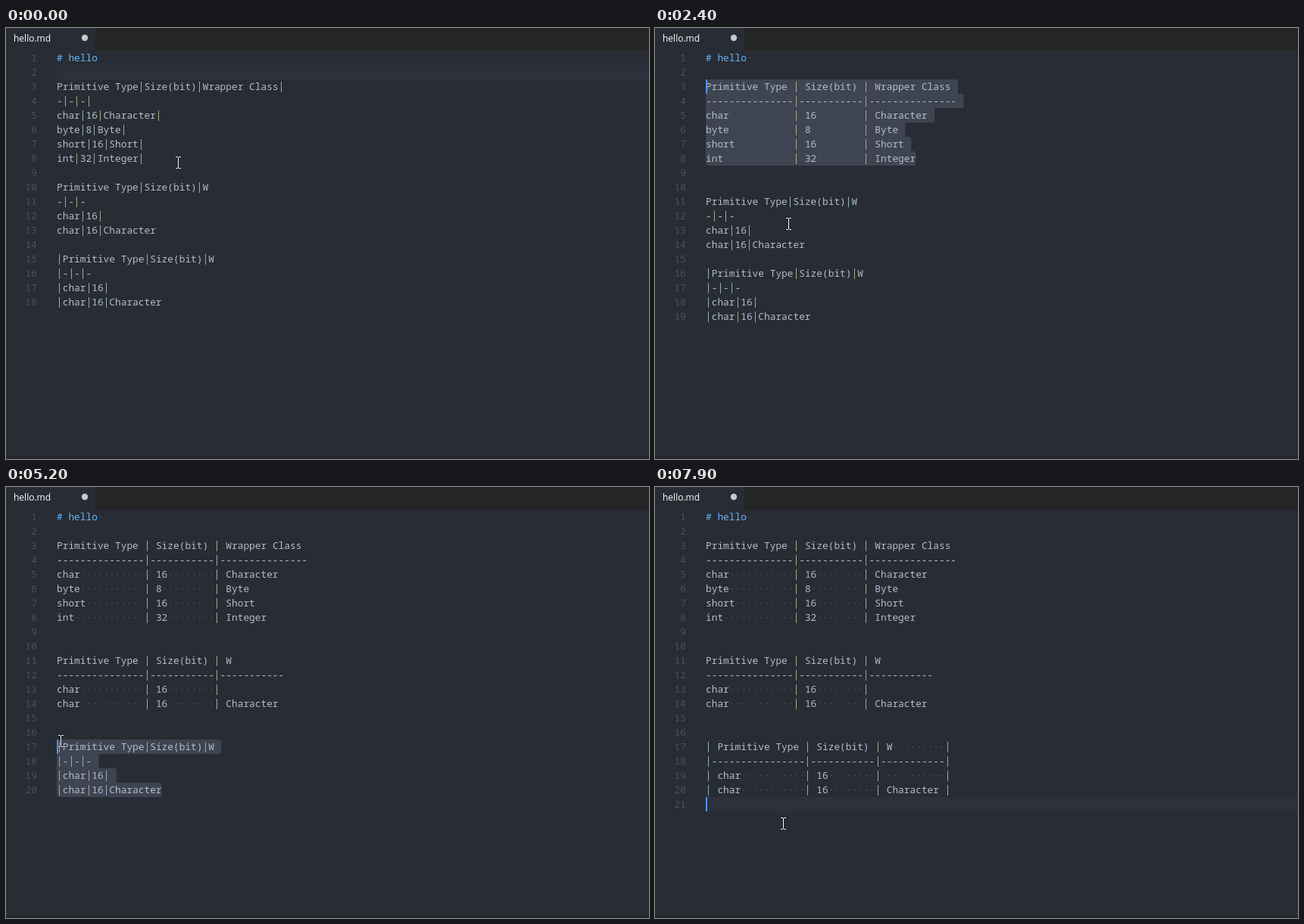
Recreate the animation shown at these times as an HTML page with a canvas. Size 849x570 px, loop 8300 ms.

```html
<!DOCTYPE html>
<html lang="en">
<head>
<meta charset="utf-8">
<title>Table formatting</title>
<style>
html, body { margin: 0; width: 100%; height: 100%; overflow: hidden; background: #282c34; }
canvas { display: block; width: 849px; height: 570px; }
</style>
</head>
<body>
<canvas id="stage"></canvas>
<script>
const W = 849, H = 570, LOOP = 8300, STEP = 100;
const LEFT = 67, TOP = 30, LINE = 19, CHAR = 7.7;
const MONO = '12.833px "Noto Sans Mono", monospace';
const TAB_FONT = '12px "Open Sans", sans-serif';
const LABEL_FONT = '11.4px "Open Sans", sans-serif';
const KEYS_FONT = '12px "Open Sans", sans-serif';

const canvas = document.getElementById('stage');
const ctx = canvas.getContext('2d');
const dpr = window.devicePixelRatio || 1;
canvas.width = W * dpr;
canvas.height = H * dpr;
ctx.scale(dpr, dpr);

const rowTop = row => TOP + (row - 1) * LINE;
const colX = col => LEFT + col * CHAR;

// Document versions

const header = ['Primitive Type', 'Size(bit)', 'Wrapper Class'];
const types = [
  header,
  ['char', '16', 'Character'],
  ['byte', '8', 'Byte'],
  ['short', '16', 'Short'],
  ['int', '32', 'Integer']
];
const brief = [
  ['Primitive Type', 'Size(bit)', 'W'],
  ['char', '16', ''],
  ['char', '16', 'Character']
];

function raw(rows, before = '', after = '') {
  const lines = rows.map(r => before + r.join('|') + after);
  lines.splice(1, 0, before + '-|-|-' + after);
  return lines;
}

function pretty(rows, outer) {
  const widths = rows[0].map((_, i) => Math.max(...rows.map(r => r[i].length)));
  const lines = rows.map(r => {
    const body = r.map((c, i) => c.padEnd(widths[i])).join(' | ');
    return outer ? '| ' + body + ' |' : body.trimEnd();
  });
  const rule = widths.map((w, i) => '-'.repeat(w + (i || outer ? 2 : 1))).join('|');
  lines.splice(1, 0, outer ? '|' + rule + '|' : rule);
  return lines;
}

const title = ['# hello ', ''];
const first = [...title, ...pretty(types), '', ''];
const second = [...first, ...pretty(brief), '', ''];
const versions = [
  [...title, ...raw(types, '', '|'), '', ...raw(brief), '', ...raw(brief, '|')],
  [...first, ...raw(brief), '', ...raw(brief, '|')],
  [...second, ...raw(brief, '|')],
  [...second, ...pretty(brief, true), '']
];

// Timeline: each round selects a table upwards, opens the menu and formats.

const rounds = [
  { press: 400, done: 800, open: 1300, format: 1900, top: 3, bottom: 8, x: 88, y: 93, fill: '#3e4451' },
  { press: 2800, done: 3300, open: 3800, format: 4500, top: 11, bottom: 14, x: 81, y: 245, fill: '#333842' },
  { press: 4900, done: 5200, open: 5800, format: 6600, top: 17, bottom: 20, x: 69, y: 336, fill: '#333842' }
];
const FINAL_CLICK = 7900;

const path = [
  { t: 100, x: 227, y: 178 },
  { t: 2400, x: 176, y: 259 },
  { t: 6900, x: 106, y: 401 },
  { t: 7400, x: 169, y: 445 }
];
rounds.forEach((r, i) => {
  const end = colX(versions[i][r.bottom - 1].length);
  const add = (t, x, y) => path.push({ t, x, y });
  add(r.press, end + 2, rowTop(r.bottom) + 9);
  add(r.done, LEFT + 5, rowTop(r.top) + 2);
  add(r.done + 200, LEFT + 5, rowTop(r.top) + 2);
  add(r.open - 100, r.x, r.y);
  add(r.open, r.x, r.y);
  add(r.format - 300, r.x + 37, r.y + 65);
  add(r.format - 100, r.x + 37, r.y + 65);
});
path.sort((a, b) => a.t - b.t);

function mouseAt(t) {
  const i = path.findIndex(p => p.t > t);
  if (i < 0) return path[path.length - 1];
  if (i === 0) return path[0];
  const a = path[i - 1], b = path[i];
  const k = (t - a.t) / (b.t - a.t), ease = k * k * (3 - 2 * k);
  return {
    x: Math.round(a.x + (b.x - a.x) * ease),
    y: Math.round(a.y + (b.y - a.y) * ease)
  };
}

function caretAt(t, round, lines) {
  if (!round) return [2, 0];
  if (t >= FINAL_CLICK) return [lines.length, 0];
  if (t >= round.done) return [round.top, 0];
  const { x, y } = mouseAt(t);
  const row = Math.floor((y - TOP) / LINE) + 1;
  const col = Math.round((x - LEFT - 2.5) / CHAR);
  return [row, Math.max(0, Math.min(col, lines[row - 1].length))];
}

function caretShown(t, round, menu) {
  if (!round) return false;
  if (menu) return round !== rounds[1];
  return t < 7100 || t >= 7600;
}

// Drawing

function rect(x, y, w, h, color) {
  ctx.fillStyle = color;
  ctx.fillRect(x, y, w, h);
}

function text(str, x, y, color, font, align = 'left') {
  ctx.font = font;
  ctx.textAlign = align;
  ctx.fillStyle = color;
  ctx.fillText(str, x, y);
}

function drawTabs() {
  rect(0, 0, W, TOP, '#252526');
  rect(0, 0, 118, TOP, '#282c34');
  text('hello.md', 10, 18, '#ffffff', TAB_FONT);
  ctx.beginPath();
  ctx.arc(104, 13, 4.2, 0, Math.PI * 2);
  ctx.fillStyle = '#c8c8c8';
  ctx.fill();
}

function drawSelection([r0, c0], r1, lines, fill) {
  const spans = [];
  for (let r = r0; r <= r1; r++) {
    const newline = r < r1 ? 9.5 : 0;
    spans.push([colX(r === r0 ? c0 : 0), colX(lines[r - 1].length) + newline]);
  }
  const radius = joined => joined ? 0 : 3;
  ctx.fillStyle = fill;
  spans.forEach(([a, b], i) => {
    const up = spans[i - 1], down = spans[i + 1];
    ctx.beginPath();
    ctx.roundRect(a, rowTop(r0 + i), b - a, LINE, [
      radius(up && up[0] <= a), radius(up && up[1] >= b),
      radius(down && down[1] >= b), radius(down && down[0] <= a)
    ]);
    ctx.fill();
  });
}

function drawLine(str, row) {
  const y = rowTop(row);
  const color = str[0] === '#' ? '#66b6f8' : '#b6bdca';
  text(row, 41, y + 14, '#495162', MONO, 'right');
  for (const m of str.matchAll(/[^ |]+/g)) text(m[0], colX(m.index), y + 14, color, MONO);
  for (const m of str.matchAll(/\|/g)) {
    const tint = m.index % 2 ? '#aba58c' : '#8fadc0';
    rect(Math.round(colX(m.index) + 3.2), y + 3, 1, 14, tint);
  }
  for (const m of str.matchAll(/ {2,}| $/g)) {
    for (let i = 0; i < m[0].length; i++) {
      rect(colX(m.index + i) + 3.2, y + 9, 1.4, 1.4, '#525863');
    }
  }
}

const items = [
  ['Change All Occurrences', 'Ctrl+F2'],
  ['Format Document', 'Alt+Shift+F'],
  ['Format Selection', ''],
  ['Cut', 'Ctrl+X'],
  ['Copy', 'Ctrl+C'],
  ['Paste', 'Ctrl+V']
];

function drawMenu({ x, y }, mouse) {
  const w = 247, h = 161;
  rect(x + 2, y + 2, w, h, 'rgba(0,0,0,.55)');
  rect(x, y, w, h, '#c4c4c4');
  rect(x + 1, y + 1, w - 2, h - 2, '#ffffff');
  rect(x + 1, y + 80, w - 2, 1, '#e4e4e4');
  items.forEach(([label, keys], i) => {
    const top = y + 3 + 24 * i + (i > 2 ? 11 : 0);
    const hover = mouse.y >= top && mouse.y < top + 24;
    if (hover) rect(x + 1, top, w - 2, 24, '#e9e9e9');
    text(label, x + 26, top + 17, '#111111', LABEL_FONT);
    text(keys, x + 223, top + 17, hover ? '#111111' : '#949494', KEYS_FONT, 'right');
  });
}

function drawBeam({ x, y }) {
  for (const [grow, color] of [[.5, '#1c1f25'], [0, '#ffffff']]) {
    const part = (dx, dy, w, h) =>
      rect(x + dx - grow, y + dy - grow, w + 2 * grow, h + 2 * grow, color);
    part(0, -7, 1, 14);
    for (const dy of [-8, 7]) {
      part(-3, dy, 3, 1);
      part(1, dy, 3, 1);
    }
  }
}

const arrow = new Path2D('M.5 .5v16l4-3.5 2.5 5.5 2.5-1-2.5-5.5h5z');

function drawArrow({ x, y }) {
  ctx.save();
  ctx.translate(x, y);
  ctx.fillStyle = '#ffffff';
  ctx.fill(arrow);
  ctx.strokeStyle = '#000000';
  ctx.stroke(arrow);
  ctx.restore();
}

function draw(t) {
  const lines = versions[rounds.filter(r => t >= r.format).length];
  const round = rounds.filter(r => t >= r.press).pop();
  const menu = round && t >= round.open && t < round.format;
  const mouse = mouseAt(t);
  const [row, col] = caretAt(t, round, lines);

  rect(0, 0, W, H, '#282c34');
  drawTabs();
  rect(0, 566, W, 4, '#22262d');

  if (!round || t >= FINAL_CLICK) rect(LEFT, rowTop(row), W - LEFT, LINE, '#2c313c');
  else drawSelection([row, col], round.bottom, lines, menu ? round.fill : '#3e4451');
  lines.forEach((str, i) => drawLine(str, i + 1));
  if (caretShown(t, round, menu)) rect(Math.round(colX(col)), rowTop(row), 2, LINE, '#528bff');

  if (menu) {
    drawMenu(round, mouse);
    drawArrow(mouse);
  } else {
    drawBeam(mouse);
  }
}

const start = performance.now();
function tick() {
  const t = (performance.now() - start) % LOOP;
  draw(Math.floor(t / STEP) * STEP);
  requestAnimationFrame(tick);
}
tick();
</script>
</body>
</html>
```
